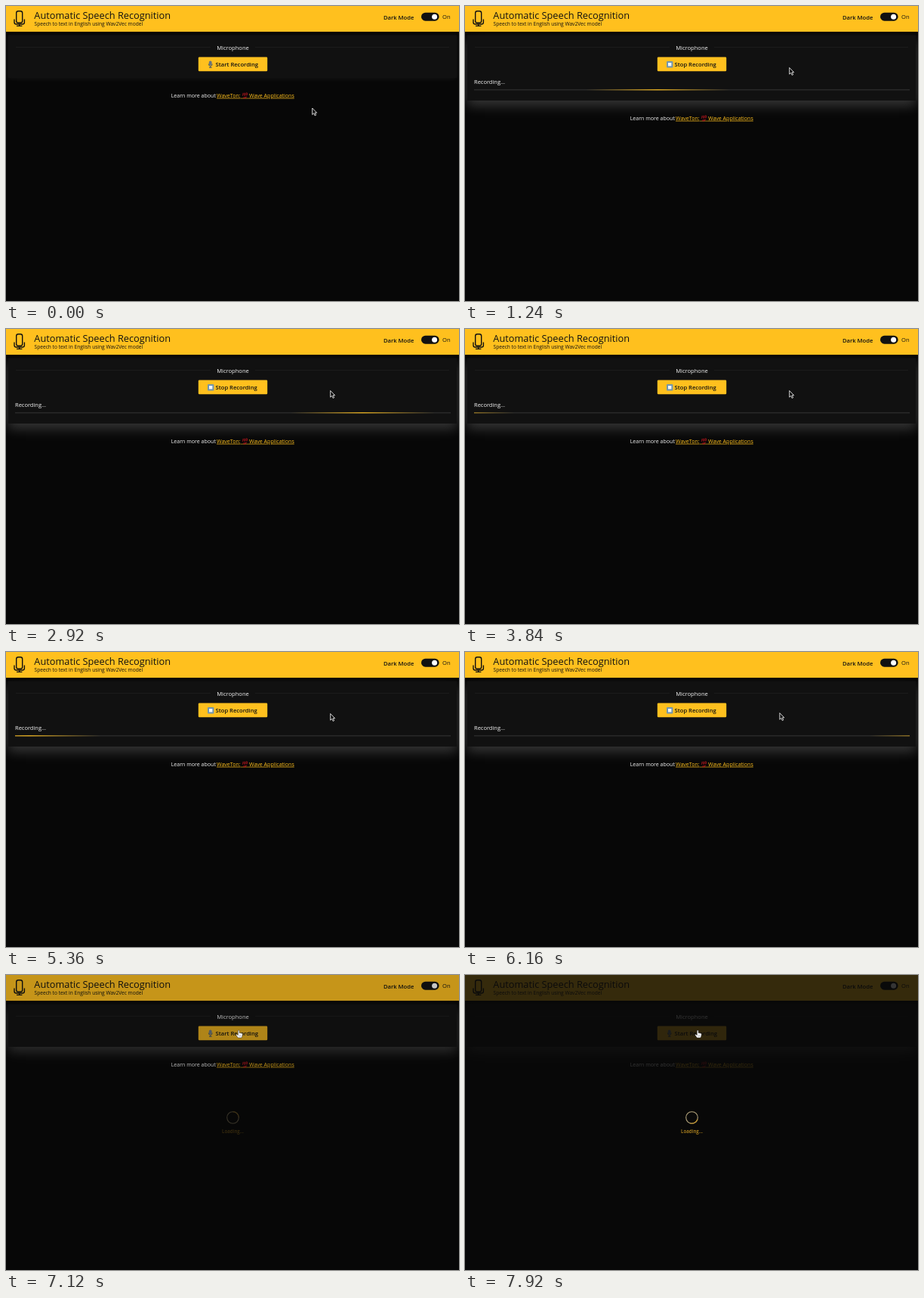
These frames come from a looping animation (600 by 390 pixels, 8000 ms). An HTML page:

```html
<!DOCTYPE html>
<html lang="en">
<head>
<meta charset="utf-8">
<title>Automatic Speech Recognition</title>
<style>
  html, body { margin: 0; width: 100%; height: 100%; overflow: hidden; background: #070707; }
  #stage { position: relative; width: 600px; height: 390px; overflow: hidden; background: #070707; }
  #card { position: absolute; left: 3px; top: 38px; width: 594px; background: #111; }
  svg { position: absolute; left: 0; top: 0; font: 7.6px "Open Sans", "Noto Sans", sans-serif; fill: #f4f4f4; }
  .dark { fill: #111; }
  .bold { font-weight: 600; }
  .link { fill: #ffc01e; text-decoration: underline; }
</style>
</head>
<body>
<div id="stage">
  <div id="card"></div>
  <svg width="600" height="390" viewBox="0 0 600 390">
    <defs>
      <linearGradient id="sweep">
        <stop stop-color="#ffc01e" stop-opacity="0"/>
        <stop offset=".5" stop-color="#ffc01e"/>
        <stop offset="1" stop-color="#ffc01e" stop-opacity="0"/>
      </linearGradient>
      <linearGradient id="headerShade" x2="0" y2="1">
        <stop stop-color="#000" stop-opacity=".7"/>
        <stop offset="1" stop-color="#000" stop-opacity="0"/>
      </linearGradient>
      <clipPath id="trackClip"><rect x="12" y="109" width="577" height="4"/></clipPath>
    </defs>

    <!-- Header -->
    <rect y="34" width="600" height="6" fill="url(#headerShade)"/>
    <rect width="600" height="34" fill="#ffc01e"/>
    <g fill="none" stroke="#111" stroke-width="1.4">
      <rect x="13.7" y="6.7" width="8" height="15.6" rx="2.6"/>
      <path d="M11 17.4v4q0 2.6 2.6 2.6h8.2q2.6 0 2.6-2.6v-4M17.7 24v2.4M14 26.4h7.4"/>
    </g>
    <text class="dark" x="37.3" y="17" font-size="12.77">Automatic Speech Recognition</text>
    <text class="dark" x="37.6" y="26.4" font-size="6.62">Speech to text in English using Wav2Vec model</text>
    <text class="dark bold" x="500" y="17.7">Dark Mode</text>
    <rect class="dark" x="550" y="8.7" width="23.6" height="11" rx="5.5"/>
    <circle cx="567.6" cy="14.2" r="3.5" fill="#fff"/>
    <text class="dark" x="578" y="17.4">On</text>

    <!-- Card contents -->
    <path d="M13 54.5H271M330 54.5H587" stroke="#1b1b1b"/>
    <text x="300.5" y="57.6" text-anchor="middle">Microphone</text>
    <rect id="button" x="254.8" y="67.5" width="91.4" height="18.7" rx="1.3"/>
    <g id="startIcon">
      <rect x="268.8" y="72.6" width="3.8" height="6" rx="1.9" fill="#68747e"/>
      <path d="M268.4 76.5q0 3 2.4 3t2.4-3M270.8 79.5v1.6M269 81.4h3.6" fill="none" stroke="#4b5862"/>
    </g>
    <g id="stopIcon">
      <rect x="267" y="73" width="8.4" height="8.4" rx="1" fill="#7296ad"/>
      <rect x="269" y="75" width="4.4" height="4.4" fill="#f4f8fa"/>
    </g>
    <text id="label" class="dark bold" x="277.6" y="79.9"></text>
    <g id="progress">
      <text x="12" y="103" font-size="7.5">Recording...</text>
      <rect x="12" y="110.2" width="577" height="1.2" fill="#303030"/>
      <g clip-path="url(#trackClip)">
        <rect id="bar" y="110.2" width="190.4" height="1.2" fill="url(#sweep)"/>
      </g>
    </g>

    <g id="footer" font-size="7.05">
      <text x="218.7" y="120.7">Learn more about</text>
      <text class="link" x="279" y="120.7">WaveTon:</text>
      <path d="M311 122.1h11" stroke="#ffc01e" stroke-width=".6"/>
      <g fill="none" stroke="#a5151c" stroke-width=".9">
        <path d="M314.2 114.8l-.8 4M313.8 121.3l5.4-1.2M314.8 122.2l3.2-.7"/>
        <ellipse cx="316.2" cy="116.8" rx=".9" ry="1.7"/>
        <ellipse cx="318.8" cy="116.3" rx=".9" ry="1.7"/>
      </g>
      <text class="link" x="322" y="120.7">Wave Applications</text>
    </g>

    <g id="overlay">
      <rect width="600" height="390" fill="#090909" opacity=".82"/>
      <g fill="none" stroke-width="1.1">
        <circle cx="300.5" cy="188.5" r="7.8" stroke="#b3a47c"/>
        <path id="spinner" d="M295 183a7.8 7.8 0 0 1 11 0" stroke="#c4952a"/>
      </g>
      <text class="bold" x="300.5" y="208.8" text-anchor="middle" font-size="6.2" style="fill:#b98b20">Loading...</text>
    </g>

    <g id="arrow">
      <path d="M0 0V8.6L2 6.8 3.4 9.9 4.9 9.2 3.5 6.2H6Z" fill="#111" stroke="#fff" stroke-width=".8"/>
    </g>
    <g id="hand">
      <path d="M-.9.4Q0-.8.9.4V3.2l3.2.7q1.2.4 1 1.7l-.6 2.6-.8 1.6H-.8L-3.4 6.4q-.6-1.3.6-1.2L-.9 6.4Z" fill="#fff" stroke="#222" stroke-width=".5"/>
      <path d="M1 6v2.4M2.6 6v2.4" stroke="#555" stroke-width=".4"/>
    </g>
  </svg>
</div>
<script>
const LOOP = 8000, RECORD_AT = 868, STOP_AT = 6760, LOADING_AT = 6980;
const SWEEP = 1440, FADE = 500, SPIN = 650;
const cursorPath = [
  [40, 405.7, 135], [600, 308, 74], [900, 308, 74],
  [1200, 429.7, 81.5], [6060, 429.7, 81.5], [6560, 308.2, 73.2]
];
const el = id => document.getElementById(id);
const show = (id, on) => el(id).setAttribute('display', on ? 'inline' : 'none');
const clamp = v => Math.max(0, Math.min(1, v));
const mix = (a, b, p) => a + (b - a) * p;
const smooth = p => p * p * (3 - 2 * p);

// cubic-bezier(.25, .1, .25, 1), solved by bisection
function ease(x) {
  let lo = 0, hi = 1, s = .5;
  for (let i = 0; i < 20; i++) {
    s = (lo + hi) / 2;
    if (.75 * s * (1 - s) + s ** 3 < x) lo = s; else hi = s;
  }
  return .3 * s * (1 - s) ** 2 + 3 * s * s * (1 - s) + s ** 3;
}

function cursorAt(t) {
  const next = cursorPath.findIndex(key => key[0] > t);
  if (next === 0) return cursorPath[0].slice(1);
  if (next < 0) return cursorPath[cursorPath.length - 1].slice(1);
  const [t0, x0, y0] = cursorPath[next - 1], [t1, x1, y1] = cursorPath[next];
  const p = smooth((t - t0) / (t1 - t0));
  return [mix(x0, x1, p), mix(y0, y1, p)];
}

function draw(t) {
  const recording = t >= RECORD_AT && t < STOP_AT;
  const [x, y] = cursorAt(t);
  const hover = x > 255 && x < 346 && y > 68 && y < 86;
  const lift = clamp((99 - y) / 12);

  el('card').style.height = (recording ? 87 : 57) + 'px';
  el('card').style.boxShadow =
    `0 ${mix(1, 7, lift)}px ${mix(6, 15, lift)}px rgba(255,255,255,${mix(.06, .19, lift)})`;
  el('button').setAttribute('fill', hover ? '#e2aa1d' : '#ffc01e');
  el('label').textContent = recording ? 'Stop Recording' : 'Start Recording';
  show('startIcon', !recording);
  show('stopIcon', recording);
  show('progress', recording);
  el('footer').setAttribute('transform', `translate(0 ${recording ? 30 : 0})`);

  const phase = Math.max(0, t - RECORD_AT) % SWEEP / SWEEP;
  el('bar').setAttribute('x', 12 + 577 * mix(-.3, 1, ease(phase)));

  el('overlay').setAttribute('opacity', clamp((t - LOADING_AT) / FADE));
  const turn = Math.max(0, t - LOADING_AT) % SPIN / SPIN;
  el('spinner').setAttribute('transform', `rotate(${360 * smooth(turn)} 300.5 188.5)`);

  show('arrow', !hover);
  show('hand', hover);
  for (const id of ['arrow', 'hand']) el(id).setAttribute('transform', `translate(${x} ${y})`);
}

function frame() {
  draw(performance.now() % LOOP);
  requestAnimationFrame(frame);
}
frame();
</script>
</body>
</html>
```
